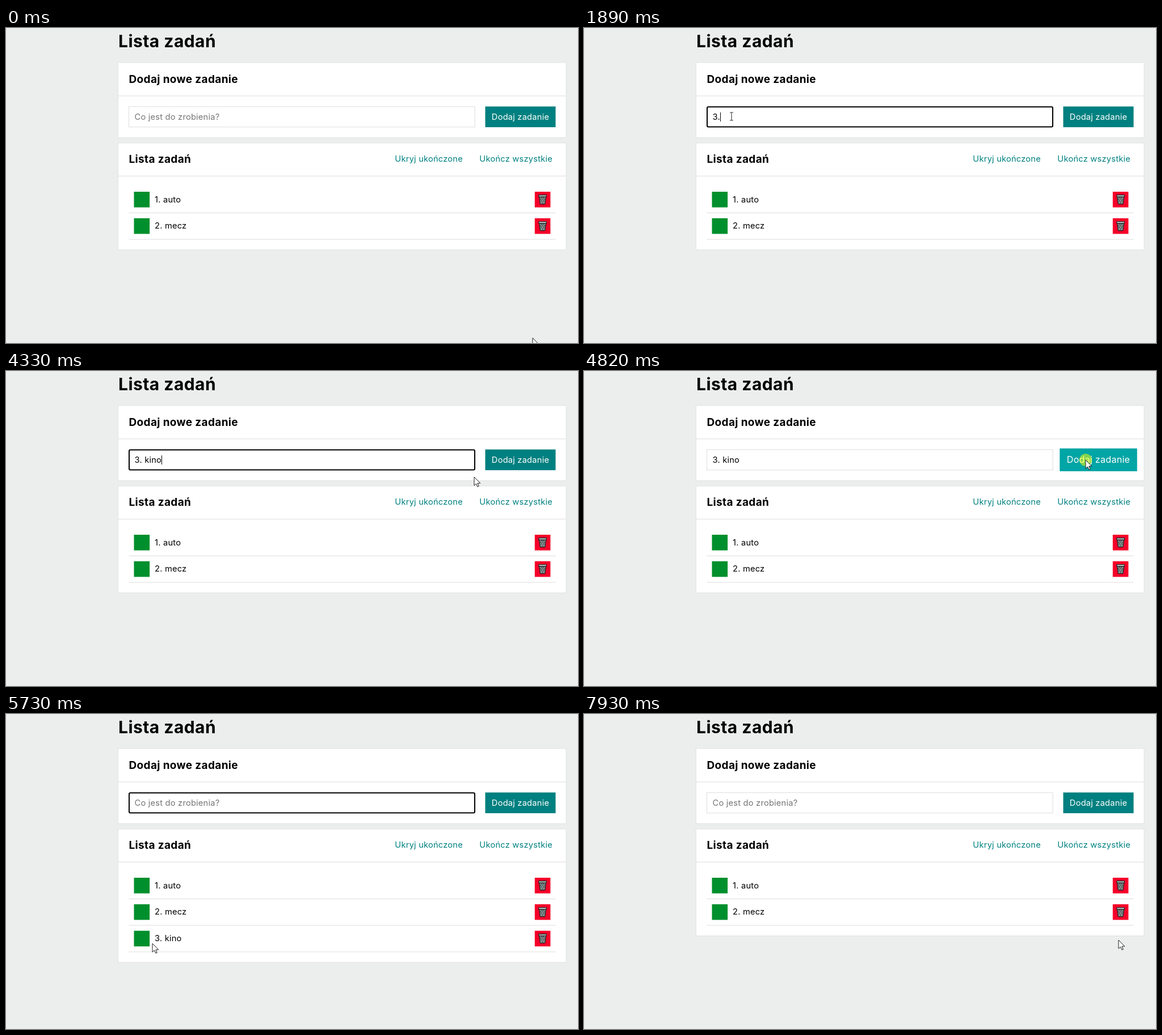
Animation of 1008 by 556 pixels, one loop 7.99 s. Source, as an HTML page:

```html
<!DOCTYPE html>
<html lang="pl">
<head>
<meta charset="utf-8">
<title>Lista zadań</title>
<style>
  html, body { margin: 0; width: 100%; height: 100%; overflow: hidden; background: #eceeed; }
  svg { display: block; width: 100%; height: 100%; }
  text { font: 400 14.7px Inter, sans-serif; letter-spacing: .2px; white-space: pre; }
  .h1 { font-weight: 700; font-size: 30px; letter-spacing: .45px; }
  .h2 { font-weight: 700; font-size: 19px; letter-spacing: .35px; }
  .panel { fill: #fff; stroke: #e1e3e2; }
  .line { stroke: #ddd; }
  .link { fill: #008080; text-anchor: end; }
  .done { text-decoration: line-through; }
</style>
</head>
<body>
<svg viewBox="0 0 1008 556">
  <defs>
    <g id="bin">
      <path d="M-6-4.5h12l-1.6 12q-.2 1-1.2 1h-6.4q-1 0-1.2-1z" fill="#8d9696" stroke="#1c1c1c" stroke-width="1.2"/>
      <path d="M-4.6-1.5 1 7.5M-2.4-4 3.9 5M1-4 5 2M4.6-1.5-1 7.5M2.4-4-3.9 5M-1-4-5 2" stroke="#414848" stroke-width=".8"/>
      <rect x="-7" y="-7.6" width="14" height="3.4" rx="1.4" fill="#b4bbbb" stroke="#1c1c1c" stroke-width="1.2"/>
    </g>
  </defs>
  <rect width="1008" height="556" fill="#eceeed"/>
  <text class="h1" x="198" y="34">Lista zadań</text>

  <rect class="panel" x="197.5" y="61" width="789.5" height="132.5"/>
  <text class="h2" x="216.5" y="96.5">Dodaj nowe zadanie</text>
  <path class="line" d="M198 119.9H987"/>
  <rect id="field" fill="#fff"/>
  <text id="value" x="226.5" y="161.5"></text>
  <rect id="caret" y="149" width="1" height="16"/>
  <g id="add">
    <rect x="-62" y="-18.3" width="124" height="36.6"/>
    <text y="4.7" fill="#fff" text-anchor="middle">Dodaj zadanie</text>
  </g>

  <rect id="list" class="panel" x="197.5" y="203" width="789.5"/>
  <text class="h2" x="216.5" y="237.5">Lista zadań</text>
  <text class="link" x="805" y="236">Ukryj ukończone</text>
  <text class="link" x="963" y="236">Ukończ wszystkie</text>
  <path class="line" d="M198 261.3H987"/>
  <g id="rows"></g>

  <circle id="spot" r="11" fill="#ff0" opacity=".52"/>
  <path id="arrow" d="M0 0V15.2L3.5 12 5.9 17.3 8.2 16.3 5.9 11.1H10.8Z" fill="#fff" stroke="#111" stroke-width=".95"/>
  <path id="beam" d="M-3-7H-1Q0-7 0-6 0-7 1-7H3M0-6V6M-3 7H-1Q0 7 0 6 0 7 1 7H3" fill="none" stroke="#333" stroke-width="1.1"/>
</svg>
<script>
const LOOP = 7990, FOCUS = 690, PRESS = 4750, ADDED = 4960, BLUR = 6080, CHECKED = 6220, REMOVED = 7590;
const TYPED = '3. kino', KEYS = [1490, 1890, 2230, 2650, 2770, 2970, 3170];
const CLICKS = [[FOCUS, 820], [PRESS, ADDED], [BLUR, CHECKED], [7380, REMOVED]];

// Pointer tracks: [time, x, y]
const TRACKS = [
  [[0, 928, 547], [140, 800, 440], [280, 590, 310], [420, 400, 216], [560, 280, 163], [680, 260, 156]],
  [[3700, 265, 158], [3910, 390, 180], [4050, 560, 200], [4190, 732, 201], [4330, 825, 187], [4470, 872, 166], [4610, 884, 157],
   [5100, 884, 157], [5240, 868, 180], [5450, 650, 290], [5590, 430, 352], [5730, 258, 405], [5870, 240, 398],
   [6290, 240, 397], [6430, 265, 444], [6500, 297, 494]],
  [[6770, 790, 533], [6910, 836, 500], [7050, 898, 440], [7190, 936, 404], [7310, 942, 399]]
];

const el = id => document.getElementById(id);
const set = (node, attrs) => { for (const k in attrs) node.setAttribute(k, attrs[k]); };
const show = (node, on) => set(node, { visibility: on ? 'visible' : 'hidden' });
const place = (node, [x, y]) => set(node, { transform: `translate(${x} ${y})` });
const clamp = v => Math.min(1, Math.max(0, v));
const ease = v => v * v * (3 - 2 * v);
const within = (t, a, b) => t >= a && t < b;

el('rows').innerHTML = ['1. auto', '2. mecz', TYPED].map((name, i) => `
  <g transform="translate(0 ${(302.8 + 46.8 * i).toFixed(1)})">
    <rect x="225.5" y="-13.8" width="27.6" height="27.6" fill="#008f2d"/>
    <path class="tick" d="M234.5 .5 237.6 5 243.8-5.5" fill="none" stroke="#fff" stroke-width="1.7" visibility="hidden"/>
    <text x="262" y="4.8">${name}</text>
    <rect x="931.8" y="-13.8" width="27.6" height="27.6" fill="#f50029"/>
    <use href="#bin" x="945.6" y="-.5"/>
    <path class="line" d="M216.5 23.5H968.5"/>
  </g>`).join('');
const third = el('rows').lastElementChild;
const tick = third.querySelector('.tick'), label = third.querySelector('text');

function pointer(t) {
  const track = TRACKS.filter(p => p[0][0] <= t).pop();
  const start = track[0][0], now = start + Math.floor((t - start) / 70) * 70;
  const i = track.findIndex(p => p[0] > now);
  if (i < 0) return track[track.length - 1].slice(1);
  const a = track[i - 1], b = track[i], f = (now - a[0]) / (b[0] - a[0]);
  const before = track[i - 2] || a, after = track[i + 1] || b;
  const slope = (p, q, k) => q[0] > p[0] ? (q[k] - p[k]) / (q[0] - p[0]) * (b[0] - a[0]) : 0;
  const tangent = (p, m, q, k) => {
    const l = slope(p, m, k), r = slope(m, q, k);
    return l * r > 0 ? 2 * l * r / (l + r) : 0;
  };
  return [1, 2].map(k => {
    const m0 = i < 2 ? slope(a, b, k) : tangent(before, a, b, k);
    const m1 = tangent(a, b, after, k);
    return a[k] + (b[k] - a[k]) * ease(f) + m0 * f * (1 - f) ** 2 - m1 * f * f * (1 - f);
  });
}

function drawField(t) {
  const focused = within(t, FOCUS, PRESS) || within(t, ADDED, BLUR);
  set(el('field'), focused
    ? { x: 217, y: 139.2, width: 609, height: 35.4, rx: 2, stroke: '#000', 'stroke-width': 2 }
    : { x: 216.5, y: 138.8, width: 609.7, height: 36, rx: 0, stroke: '#ddd', 'stroke-width': 1 });
  const text = t < ADDED ? TYPED.slice(0, KEYS.filter(k => k <= t).length) : '';
  const value = el('value');
  value.textContent = text || 'Co jest do zrobienia?';
  set(value, { fill: text ? '#000' : '#757575' });
  const last = [FOCUS, ...KEYS, ADDED].filter(k => k <= t).pop();
  show(el('caret'), focused && (t - last) % 1060 < 530);
  set(el('caret'), { x: text ? Math.round(226.5 + value.getComputedTextLength()) : 227 });
}

function drawButton(t) {
  const h = ease(clamp((t - 4400) / 200)) * (1 - ease(clamp((t - 5180) / 200)));
  const c = Math.round(128 + 37 * h);
  set(el('add'), { transform: `translate(906.5 156.8) scale(${1 + .1 * h})` });
  set(el('add').firstElementChild, { fill: `rgb(0,${c},${c})` });
}

function draw(t) {
  drawField(t);
  drawButton(t);
  const extra = within(t, ADDED, REMOVED), done = extra && t >= CHECKED;
  set(el('list'), { height: extra ? 235.3 : 188.5 });
  set(third, { display: extra ? 'inline' : 'none' });
  show(tick, done);
  label.classList.toggle('done', done);

  const p = pointer(t), [x, y] = p;
  const visible = !within(t, 6570, 6770);
  const overField = x > 216 && x < 827 && y > 138 && y < 176;
  for (const id of ['spot', 'arrow', 'beam']) place(el(id), p);
  show(el('spot'), CLICKS.some(c => within(t, ...c)));
  show(el('arrow'), visible && !overField);
  show(el('beam'), visible && overField);
}

const begin = performance.now();
function frame() {
  draw((performance.now() - begin) % LOOP);
  requestAnimationFrame(frame);
}
frame();
</script>
</body>
</html>
```
